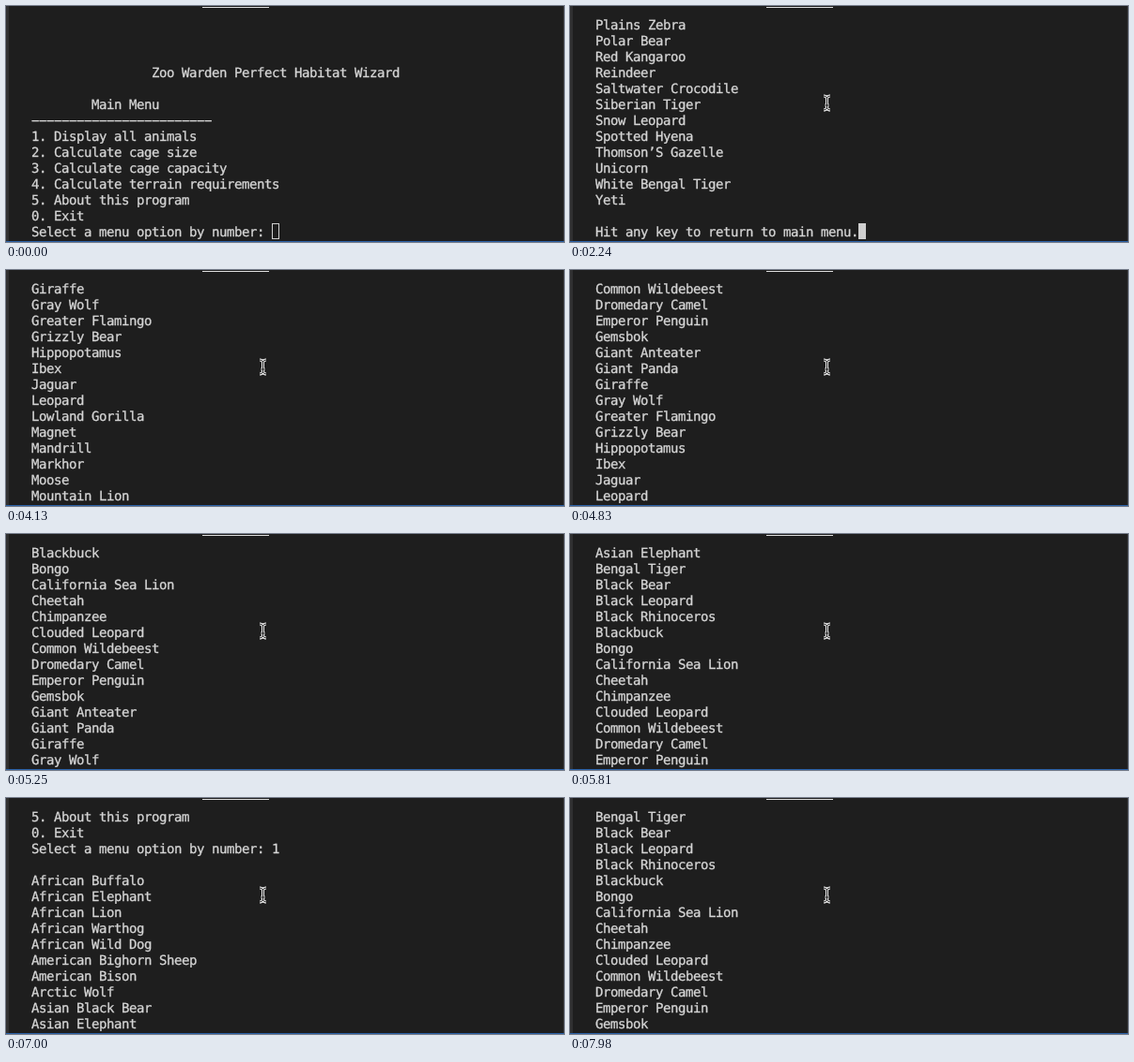
An HTML page that plays this animation: 594x252 px, repeating every 8 s.

```html
<!DOCTYPE html>
<html lang="en">
<head>
<meta charset="utf-8">
<title>Habitat menu</title>
<style>
  html, body { margin: 0; width: 100%; height: 100%; overflow: hidden; background: #1e1e1e; }
  body > * { position: absolute; }
  #screen {
    margin: 0; left: 27px; top: 13px; color: #d6d6d6;
    font: 14px/17px "DejaVu Sans Mono", monospace;
    letter-spacing: -0.43px;
    text-rendering: geometricPrecision;
    -webkit-text-stroke: 0.3px #d6d6d6;
  }
  #edge { left: 0; top: 0; width: 3px; height: 252px; background: #303031; }
  #rim { left: 593px; top: 0; width: 1px; height: 252px; background: #303031; }
  #tab { left: 209px; top: 1px; width: 71px; height: 1px; background: #e0e0e0; }
  #status { left: 0; top: 251px; width: 594px; height: 1px; background: #2b62a8; }
  #caret { top: 232px; width: 8px; height: 17px; box-sizing: border-box; border: 1px solid #cfcfcf; }
  #caret.solid { background: #cfcfcf; }
  #mouse { left: 0; top: 0; overflow: visible; fill: none; }
</style>
</head>
<body>
<div id="edge"></div>
<div id="rim"></div>
<pre id="screen"></pre>
<div id="caret"></div>
<div id="tab"></div>
<div id="status"></div>
<svg id="mouse" width="1" height="1">
  <defs><path id="shape" d="M-3.5-7.5Q-1-7.5 0-5.5Q1-7.5 3.5-7.5M-3.5 7.5Q-1 7.5 0 5.5Q1 7.5 3.5 7.5M0-6V6M-2 2.5H2"/></defs>
  <g id="beam">
    <use href="#shape" stroke="#f2f2f2" stroke-width="3"/>
    <use href="#shape" stroke="#1a1a1a"/>
  </g>
</svg>
<script>
const LOOP = 8000, STEP = 70, ROWS = 14, CELL = 8, LEFT = 27;
const FOCUSED = 560, TYPED = 1260;
const pad = n => " ".repeat(n);
const PROMPT = "Select a menu option by number: ";
const animals = `African Buffalo,African Elephant,African Lion,African Warthog,African Wild Dog,
American Bighorn Sheep,American Bison,Arctic Wolf,Asian Black Bear,Asian Elephant,Bengal Tiger,
Black Bear,Black Leopard,Black Rhinoceros,Blackbuck,Bongo,California Sea Lion,Cheetah,Chimpanzee,
Clouded Leopard,Common Wildebeest,Dromedary Camel,Emperor Penguin,Gemsbok,Giant Anteater,Giant Panda,
Giraffe,Gray Wolf,Greater Flamingo,Grizzly Bear,Hippopotamus,Ibex,Jaguar,Leopard,Lowland Gorilla,
Magnet,Mandrill,Markhor,Moose,Mountain Lion,Okapi,Olive Baboon,Ostrich,Plains Zebra,Polar Bear,
Red Kangaroo,Reindeer,Saltwater Crocodile,Siberian Tiger,Snow Leopard,Spotted Hyena,
Thomson’S Gazelle,Unicorn,White Bengal Tiger,Yeti`.split(/,\s*/);

const menu = [
  "", "", "",
  pad(16) + "Zoo Warden Perfect Habitat Wizard",
  "",
  pad(8) + "Main Menu",
  "−".repeat(24),
  "1. Display all animals",
  "2. Calculate cage size",
  "3. Calculate cage capacity",
  "4. Calculate terrain requirements",
  "5. About this program",
  "0. Exit"
];
const buffer = [...menu, PROMPT + "1", "", ...animals, "", "Hit any key to return to main menu."];
const END = buffer.length - ROWS;

// Each move: first step, last step, then the values reached
const flicks = [
  [0, 0, 0], [1610, 1610, END], [2590, 3360, 49], [3710, 4200, 40],
  [4550, 5250, 29], [5600, 6230, 16], [6650, 7000, 11], [7560, 7980, 25]
];
const glides = [
  [0, 0, 488, -137], [70, 210, 297.5, 243], [560, 630, 292.5, 236], [2100, 2240, 273.5, 103.5]
];
const linear = p => p;
const easeOut = p => 1 - (1 - p) ** 2;

function follow(moves, t, ease) {
  const i = moves.findLastIndex(move => move[0] <= t);
  const [start, end, ...to] = moves[i];
  const from = moves[Math.max(i - 1, 0)].slice(2);
  const steps = (end - start) / STEP + 1;
  const p = ease(Math.min(1, (Math.floor((t - start) / STEP) + 1) / steps));
  return to.map((v, k) => from[k] + (v - from[k]) * p);
}

const [screen, caret, beam] = ["screen", "caret", "beam"].map(id => document.getElementById(id));

function draw(t) {
  const top = Math.round(follow(flicks, t, linear)[0]);
  const lines = buffer.slice(top, top + ROWS);
  if (t < TYPED) lines[ROWS - 1] = PROMPT;
  const text = lines.join("\n");
  if (screen.textContent !== text) screen.textContent = text;

  caret.style.display = top === 0 || top === END ? "" : "none";
  caret.style.left = LEFT + CELL * lines[ROWS - 1].length + "px";
  caret.className = t < FOCUSED ? "" : "solid";

  // The pointer hides while the keyboard is in use
  const hidden = t < 70 || (t >= 910 && t < 2100);
  beam.style.display = hidden ? "none" : "";
  beam.setAttribute("transform", `translate(${follow(glides, t, easeOut)})`);
}

function tick() {
  draw(performance.now() % LOOP);
  requestAnimationFrame(tick);
}
tick();
</script>
</body>
</html>
```
